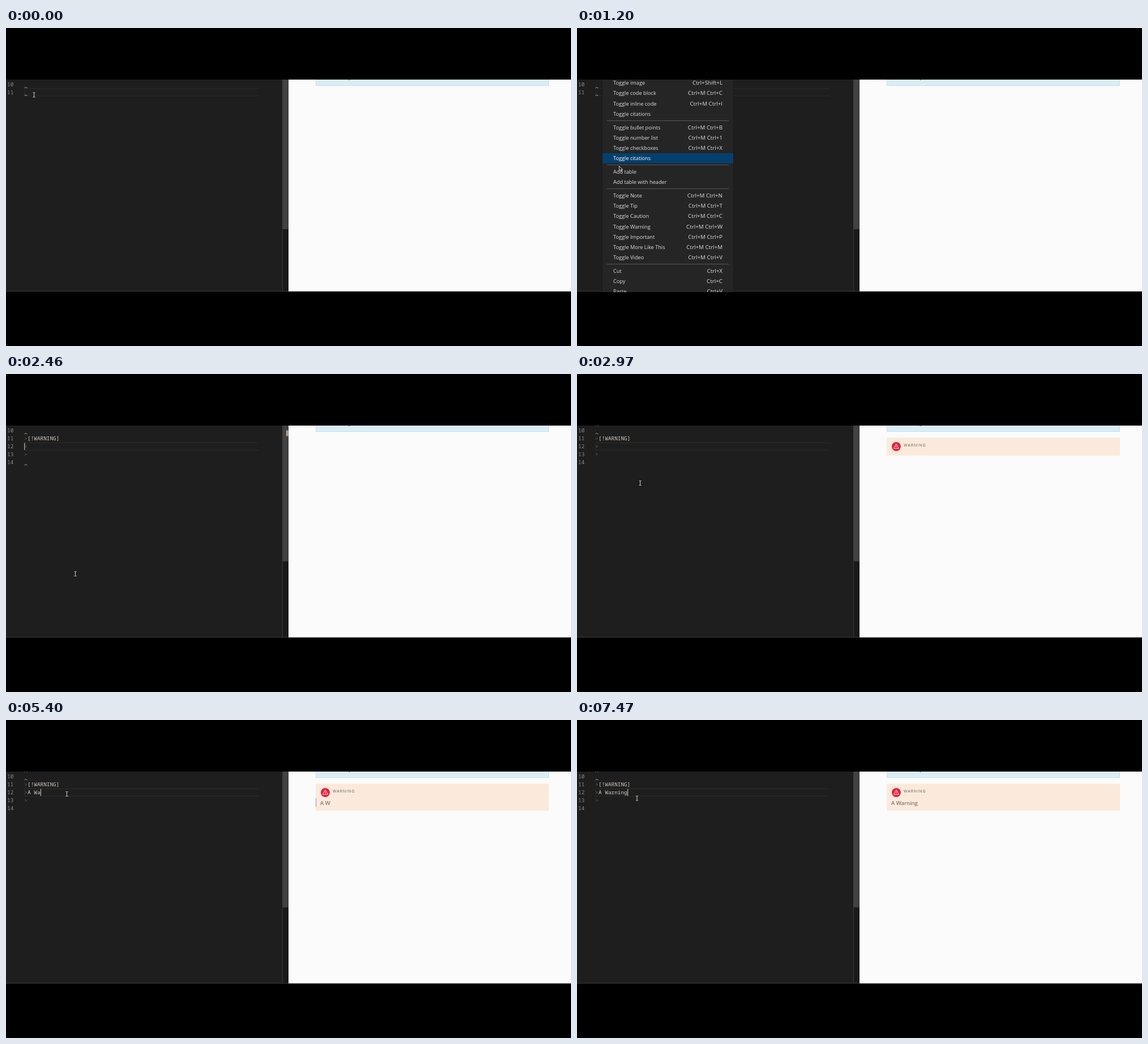
These frames come from a looping animation (998 by 561 pixels, 7500 ms). An HTML page with a canvas:

```html
<!DOCTYPE html>
<html lang="en">
<head>
<meta charset="utf-8">
<title>Editor: insert a warning block</title>
<style>
html, body { margin: 0; width: 100%; height: 100%; overflow: hidden; background: #000; }
canvas { display: block; }
</style>
</head>
<body>
<canvas id="stage" width="998" height="561"></canvas>
<script>
const ctx = document.getElementById('stage').getContext('2d');
const LOOP = 7500, TOP = 91, BOTTOM = 464;
const MONO = '9.4px "Noto Sans Mono", "DejaVu Sans Mono", monospace';
const sans = size => `${size}px "Open Sans", "Noto Sans", sans-serif`;

// Label and shortcut; null is a separator
const MENU = [
  ['Toggle image', 'Ctrl+Shift+L'], ['Toggle code block', 'Ctrl+M Ctrl+C'],
  ['Toggle inline code', 'Ctrl+M Ctrl+I'], ['Toggle citations', ''], null,
  ['Toggle bullet points', 'Ctrl+M Ctrl+B'], ['Toggle number list', 'Ctrl+M Ctrl+1'],
  ['Toggle checkboxes', 'Ctrl+M Ctrl+X'], ['Toggle citations', ''], null,
  ['Add table', ''], ['Add table with header', ''], null,
  ['Toggle Note', 'Ctrl+M Ctrl+N'], ['Toggle Tip', 'Ctrl+M Ctrl+T'],
  ['Toggle Caution', 'Ctrl+M Ctrl+C'], ['Toggle Warning', 'Ctrl+M Ctrl+W'],
  ['Toggle Important', 'Ctrl+M Ctrl+P'], ['Toggle More Like This', 'Ctrl+M Ctrl+M'],
  ['Toggle Video', 'Ctrl+M Ctrl+V'], null,
  ['Cut', 'Ctrl+X'], ['Copy', 'Ctrl+C'], ['Paste', 'Ctrl+V']
];
let nextY = 96.9;
const rows = MENU.map(item => {
  const y = nextY;
  nextY += item ? 18.15 : 5.8;
  return { item, y };
});

// Time, x, y of the mouse
const PATH = [
  [0, 49.5, 118], [1080, 49.5, 118], [1200, 74.5, 243.5], [1320, 103, 333.5], [1500, 122, 352],
  [2460, 122.5, 352.5], [2520, 122.5, 352.5], [3210, 107.5, 130.5], [7350, 107.5, 130.5], [7470, 106, 138]
];
const TYPED = [4920, 5160, 5250, 5400, 5580, 5820, 5940, 6060, 6180];
const SHOWN = [4980, 5250, 5340, 5610, 5880, 6000, 6120, 6240, 6330];
const PHRASE = 'A Warning';
const textAt = (times, t) => PHRASE.slice(0, times.filter(k => k <= t).length);
const ease = u => u * u * (3 - 2 * u);

function mouseAt(t) {
  const i = PATH.findIndex(p => p[0] > t);
  if (i < 0) return PATH[PATH.length - 1].slice(1);
  const [t0, x0, y0] = PATH[i - 1], [t1, x1, y1] = PATH[i];
  let u = (t - t0) / (t1 - t0);
  if (t0 === 2520) u = ease(u);
  return [x0 + (x1 - x0) * u, y0 + (y1 - y0) * u];
}

function caretOn(t) {
  if (t < 2460) return t >= 165 && t < 450;
  if (t < 3300) return t < 2760 || t >= 3060;
  if (t < 4920) return t < 3660 || Math.floor((t - 3660) / 300) % 2 === 1;
  return t < 6480 || Math.floor((t - 6480) / 300) % 2 === 1;
}

function rect(x, y, w, h, color) {
  ctx.fillStyle = color;
  ctx.fillRect(x, y, w, h);
}

function text(s, x, y, color, font, align = 'left') {
  ctx.font = font;
  ctx.fillStyle = color;
  ctx.textAlign = align;
  ctx.fillText(s, x, y);
}

function shape(d, stroke, fill, width = 1) {
  const p = new Path2D(d);
  if (fill) { ctx.fillStyle = fill; ctx.fill(p); }
  if (stroke) { ctx.strokeStyle = stroke; ctx.lineWidth = width; ctx.stroke(p); }
}

const squiggle = y => shape(`M32.5 ${y + 1}l2-1.6 2 1.2 1.3 .2`, '#b9b5a0', null, 0.9);

function drawEditor(t) {
  const done = t >= 2460, parsed = t >= 2700;
  rect(0, TOP, 499, BOTTOM - TOP, '#1e1e1e');

  const y = done ? 121.3 : 107;
  shape(`M445 ${y}H33v${done ? 13 : 12.7}H445`, '#2d2d2b');

  const lastLine = done ? 14 : 11;
  for (let n = 10; n <= lastLine; n++) {
    text(n, 13.3, 103 + (n - 10) * 14, '#8c8c8c', MONO, 'right');
  }
  squiggle(105);
  if (parsed) squiggle(90.5);
  else squiggle(done ? 160 : 118.5);

  if (done) {
    for (const base of [117, 131, 145]) text('>', 32.3, base, '#666554', MONO);
    text('[!WARNING]', 38, 117, '#d6cabf', MONO);
    text(textAt(TYPED, t), 38, 131, '#d4d4d4', MONO);
  }
  if (caretOn(t)) {
    const x = t < 3300 ? 32.2 : 38.3 + textAt(TYPED, t).length * 5.64;
    rect(x, done ? 121.5 : 107.5, 1.1, 12.5, '#c8c8c8');
  }

  rect(488, TOP, 11, BOTTOM - TOP, '#191919');
  rect(488, TOP, 1, BOTTOM - TOP, '#383838');
  rect(488.5, TOP, 10, (done ? 330.5 : 355) - TOP, '#424242');
  if (done && !parsed) rect(495, 99.5, 3.5, 10, '#b5a595');
}

function drawPreview(t) {
  rect(499, TOP, 499, BOTTOM - TOP, '#fbfbfb');
  rect(547, TOP, 412, 11, '#c3e0eb');
  rect(548, TOP, 410, 10, '#d9edf7');
  rect(605.5, TOP, 2, 1.2, '#6e8490');
  if (t < 2700) return;

  const words = textAt(SHOWN, t);
  rect(547, 112.3, 412, words ? 48 : 31.5, '#fbeadc');
  ctx.beginPath();
  ctx.arc(564, 128, 8, 0, 7);
  ctx.fillStyle = '#dc2442';
  ctx.fill();
  shape('M564 123.3l4.6 8h-9.2z', '#fbdfe0', null, 0.9);
  shape('M564 126v2.7M564 129.4v.9', '#fbdfe0', null, 0.9);

  ctx.letterSpacing = '1px';
  text('WARNING', 577, 128, '#625c58', sans(7));
  ctx.letterSpacing = '0px';
  text(words, 555, 149.6, '#595552', sans(9.8));
  if (t >= 4980 && t < 5880) rect(546.8, 138, 1.6, 15.5, '#b9b7b5');
}

function hoverRow(t, y) {
  if (t < 1080) return null;
  return rows.filter(r => r.item && r.y - 9.2 <= y).pop();
}

function drawMenu(t, mouseY) {
  ctx.save();
  ctx.globalAlpha = Math.min(1, (t - 510) / 90);
  ctx.beginPath();
  ctx.rect(0, TOP, 499, 375);
  ctx.clip();
  rect(44, TOP, 233, 375, '#191919');
  rect(45, TOP, 231, 375, '#252526');
  const hover = hoverRow(t, mouseY);
  for (const row of rows) {
    const { item, y } = row;
    if (!item) {
      rect(53, Math.round(y - 6.6), 215, 1, '#575757');
      continue;
    }
    const color = row === hover ? '#fff' : '#dedede';
    const base = Math.round(y + 3.3);
    if (row === hover) rect(45, Math.round(y - 9.1), 231, 17.6, '#04406f');
    text(item[0], 64, base, color, sans(9.2));
    text(item[1], 257, base, color, sans(9.8), 'right');
  }
  ctx.restore();
}

function drawMouse(t, x, y, inMenu) {
  ctx.save();
  ctx.translate(x, y);
  if (!inMenu) {
    shape('M-2-4h1.5l.5 .6 .5-.6h1.5M0-3.5v7M-2 4h1.5l.5-.6 .5 .6h1.5', '#d5d5d5');
  } else {
    const row = hoverRow(t, y);
    if (row && y <= row.y + 9) {
      shape('M-.6 0q1-.8 1.6 .2v3.2l3.6 .8q1 .4 .8 1.6l-.8 4.2h-4.6l-2.8-4q.2-1.4 2.2 .2z',
        '#222', '#fff', 0.7);
    } else {
      shape('M0 0v8.3l1.9-1.7 1.3 2.9 1.4-.6-1.3-2.8h2.5z', '#d8d8d8', '#1c1c1c', 0.9);
    }
  }
  ctx.restore();
}

function draw(t) {
  const [x, y] = mouseAt(t);
  const inMenu = t >= 540 && t < 2460;
  rect(0, 0, 998, 561, '#000');
  ctx.save();
  ctx.beginPath();
  ctx.rect(0, TOP, 998, BOTTOM - TOP);
  ctx.clip();
  drawEditor(t);
  drawPreview(t);
  ctx.restore();
  rect(0, BOTTOM, 499, 1, '#3a3a3a');
  rect(499, BOTTOM, 499, 1, '#b0b3b1');
  if (inMenu) drawMenu(t, y);
  drawMouse(t, x, y, inMenu);
}

let start;
function tick(now) {
  start ??= now;
  draw(Math.floor((now - start) % LOOP / 30) * 30);
  requestAnimationFrame(tick);
}
requestAnimationFrame(tick);
</script>
</body>
</html>
```
